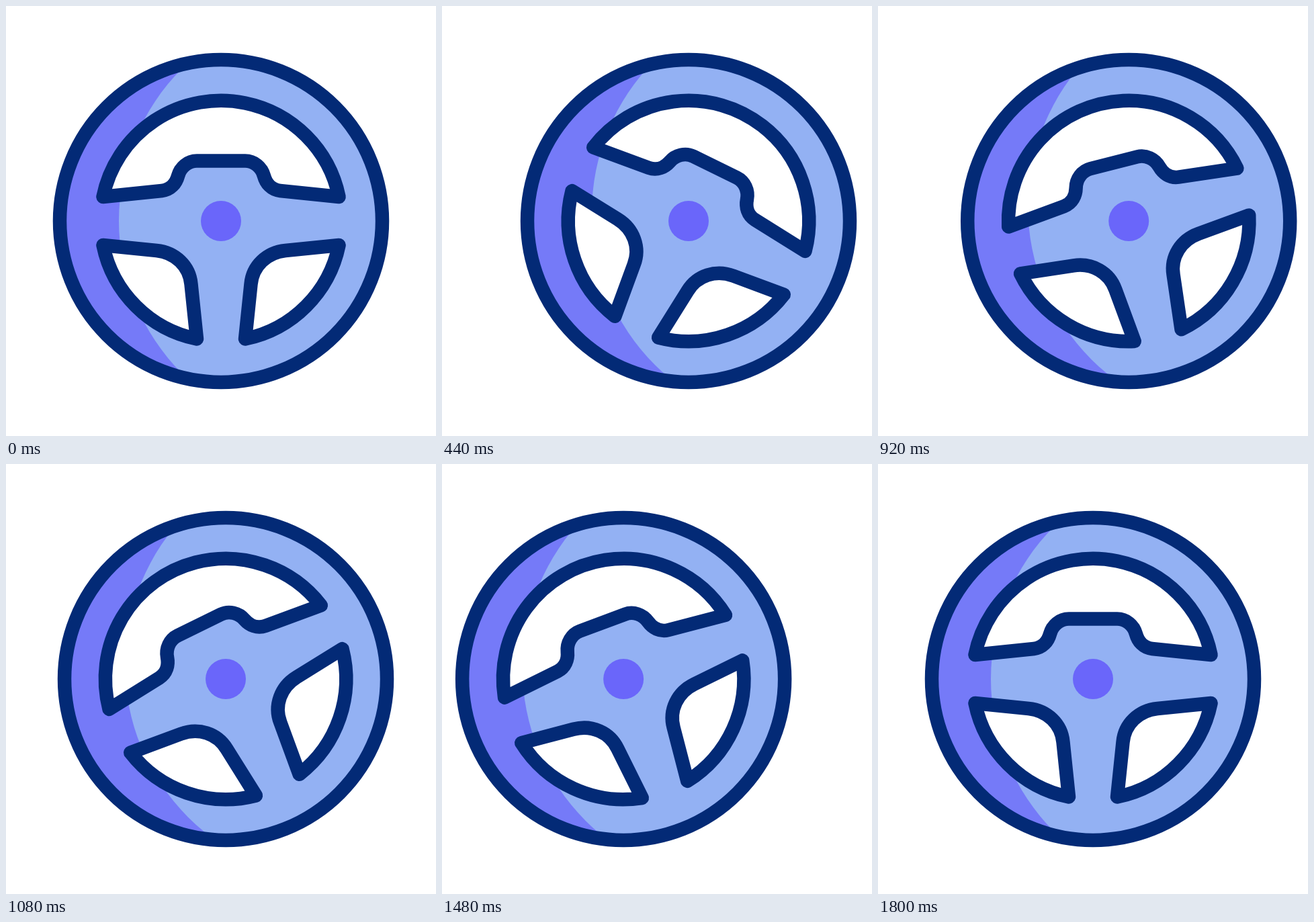
Recreate the animation shown at these times as an HTML page with a canvas. Size 640x640 px, loop 2000 ms.

```html
<!DOCTYPE html>
<html lang="en">
<head>
<meta charset="utf-8">
<title>Steering wheel</title>
<style>
  html, body { margin: 0; width: 100%; height: 100%; overflow: hidden; background: #fff; }
  canvas { display: block; width: 640px; height: 640px; }
</style>
</head>
<body>
<canvas id="stage" width="640" height="640"></canvas>
<script>
const ctx = document.getElementById('stage').getContext('2d');
const LOOP = 2000, STEP = 40;
const DARK = '#032a76', LIGHT = '#93b1f3', SHADE = '#757af8', HUB = '#6a66fa';
const LINE = 20.5, RIM = 240, HOLE = 179.2, SHADE_R = 321;
const TIP = Math.atan2(36, 175.5);

// Keys are [time, value, slope]; the slope is 0 unless given.
const shiftKeys = [[80, 0], [440, 47, 0.036], [820, 61], [840, 61], [1360, -61], [1800, 0]];
const turnKeys = [[80, 0], [440, 26.1], [560, 26.1], [1080, -26.1], [1360, -26.1], [1760, 0]];
const shadeXKeys = [[80, 0], [440, 8], [740, 2], [1360, 2], [1730, 0]];
const shadeYKeys = [[80, 0], [720, -21.3], [1360, -21.3], [1730, 0]];

function track(keys, t) {
  if (t <= keys[0][0]) return keys[0][1];
  for (let i = 1; i < keys.length; i++) {
    const [t0, v0, m0 = 0] = keys[i - 1];
    const [t1, v1, m1 = 0] = keys[i];
    if (t > t1) continue;
    const d = t1 - t0, p = (t - t0) / d, q = 1 - p;
    return v0 + (v1 - v0) * p * p * (3 - 2 * p) + d * p * q * (m0 * q - m1 * p);
  }
  return keys[keys.length - 1][1];
}

function disc(x, y, r, color) {
  ctx.beginPath();
  ctx.arc(x, y, r, 0, Math.PI * 2);
  ctx.fillStyle = color;
  ctx.fill();
}

function makeTopHole() {
  const p = new Path2D();
  p.arc(0, 0, HOLE, Math.PI + TIP, -TIP);
  p.lineTo(88, -45);
  p.bezierCurveTo(75, -46.5, 67, -56, 64, -67);
  p.bezierCurveTo(60.5, -80, 49, -89.5, 36, -89.5);
  p.lineTo(-36, -89.5);
  p.bezierCurveTo(-49, -89.5, -60.5, -80, -64, -67);
  p.bezierCurveTo(-67, -56, -75, -46.5, -88, -45);
  p.closePath();
  return p;
}

function makeSideHole() {
  const p = new Path2D();
  p.arc(0, 0, HOLE, TIP, Math.PI / 2 - TIP);
  p.lineTo(44.5, 94);
  p.bezierCurveTo(47, 67, 68, 46.8, 96, 44);
  p.closePath();
  return p;
}

const topHole = makeTopHole(), sideHole = makeSideHole();

function cut(path) {
  ctx.fillStyle = '#fff';
  ctx.fill(path);
  ctx.stroke(path);
}

function draw(t) {
  ctx.setTransform(1, 0, 0, 1, 0, 0);
  ctx.fillStyle = '#fff';
  ctx.fillRect(0, 0, 640, 640);
  ctx.translate(320 + track(shiftKeys, t), 320);
  ctx.lineWidth = LINE;
  ctx.lineJoin = 'round';
  ctx.strokeStyle = DARK;

  // The shade is what the large light disc leaves uncovered.
  disc(0, 0, RIM, SHADE);
  ctx.save();
  ctx.clip();
  disc(169 + track(shadeXKeys, t), track(shadeYKeys, t), SHADE_R, LIGHT);
  ctx.restore();

  ctx.save();
  ctx.rotate(track(turnKeys, t) * Math.PI / 180);
  cut(topHole);
  cut(sideHole);
  ctx.scale(-1, 1);
  cut(sideHole);
  ctx.restore();

  disc(0, 0, 30, HUB);
  ctx.beginPath();
  ctx.arc(0, 0, RIM, 0, Math.PI * 2);
  ctx.stroke();
}

const start = performance.now();
function tick() {
  const t = (performance.now() - start) % LOOP;
  draw(Math.floor(t / STEP) * STEP);
  requestAnimationFrame(tick);
}
tick();
</script>
</body>
</html>
```
